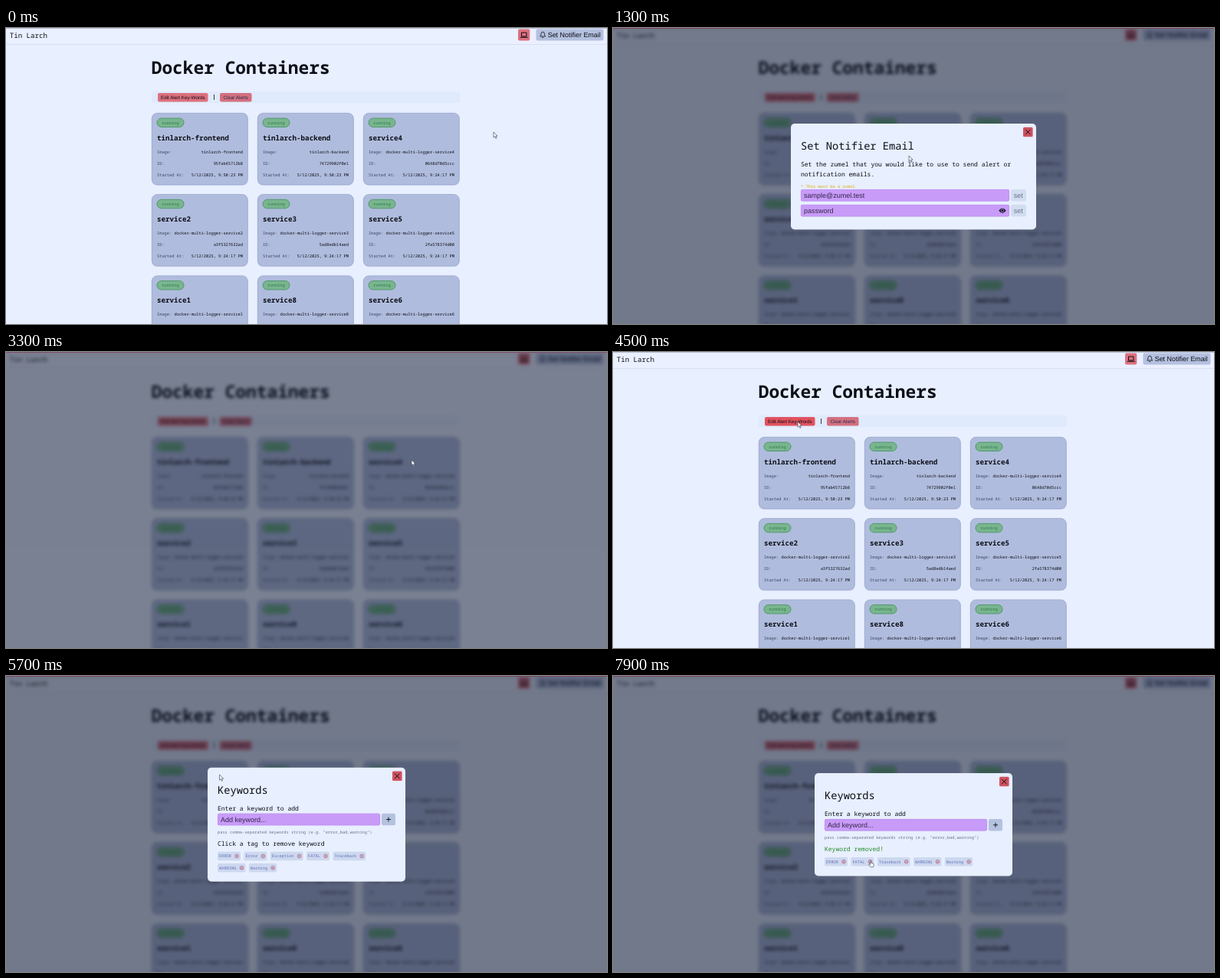
Recreate the animation shown at these times as an HTML page. Size 784 by 387 pixels, loop 8000 ms.

```html
<!DOCTYPE html>
<html lang="en">
<head>
<meta charset="utf-8">
<title>Docker Containers</title>
<style>
html, body { margin: 0; width: 100%; height: 100%; overflow: hidden; background: #e8effe; }
svg { display: block; width: 784px; height: 387px; }
text { font-family: "Noto Sans Mono", "DejaVu Sans Mono", monospace; text-rendering: geometricPrecision; white-space: pre; }
.sans { font-family: "Liberation Sans", Arial, sans-serif; }
</style>
</head>
<body>
<svg viewBox="0 0 784 387">
  <rect width="784" height="387" fill="#e8effe"/>
  <g id="page"></g>
  <g id="shade">
    <rect width="784" height="387" fill="#0a1224" fill-opacity=".53"/>
    <rect width="784" height="1" fill="#7a4560"/>
  </g>
  <g id="emailBox"></g>
  <g id="wordBox"></g>
  <g id="cursor">
    <path id="arrow" d="M0 0V7.2L1.7 5.7L2.9 8.4L4.1 7.9L2.9 5.2H5.1Z" fill="#f6f7fb" stroke="#333a48" stroke-width=".6"/>
    <path id="hand" d="M0 .8Q.7-.3 1.4 .8V3.6L4.2 4.2Q5 4.5 4.8 5.5L4.2 8.8H.4L-1.9 5.6Q-1.6 4.5 0 5.5Z" fill="#f6f7fb" stroke="#333a48" stroke-width=".6"/>
  </g>
</svg>
<script>
const LOOP = 8000, SMALL = 5.34, BODY = 8.02, HEAD = 13.7, CHAR = 3.2;
const INK = '#0b0e16';
const el = id => document.getElementById(id);

const rect = (x, y, w, h, fill, r = 0, more = '') =>
  `<rect x="${x}" y="${y}" width="${w}" height="${h}" rx="${r}" fill="${fill}" ${more}/>`;
const text = (s, x, y, size, fill = INK, more = '') =>
  `<text x="${x}" y="${y}" font-size="${size}" fill="${fill}" ${more}>${s}</text>`;
const sans = (s, x, y, size, fill = INK) => text(s, x, y, size, fill, 'class="sans"');
const line = (d, color = INK, width = 1) =>
  `<path d="${d}" fill="none" stroke="${color}" stroke-width="${width}"/>`;

function card([name, image, id, time], i) {
  const x = 190 + i % 3 * 138, y = 111 + Math.floor(i / 3) * 106.3;
  const rows = [['Image:', image], ['ID:', id], ['Started At:', `5/12/2025, ${time} PM`]];
  return rect(x, y + 1, 125.5, 94, '#c9d3ea', 7) +
    rect(x + .3, y + .3, 125, 93.5, '#b0bcdd', 7, 'stroke="#94a3ca" stroke-width=".7"') +
    rect(x + 7, y + 7, 35, 11.5, '#79b58f', 5.7, 'stroke="#3f9159" stroke-width=".8"') +
    text('running', x + 13.3, y + 14.6, SMALL, '#2c7a45') +
    text(name, x + 7, y + 35.7, 9.2, INK, 'font-weight="700"') +
    rows.map(([key, value], n) =>
      text(key, x + 7, y + 52.6 + n * 15, SMALL, '#3c4560') +
      text(value, x + 119, y + 52.6 + n * 15, SMALL, INK, 'text-anchor="end"')).join('');
}

function buildPage() {
  const service = (n, id) => ['service' + n, 'docker-multi-logger-service' + n, id, '9:24:17'];
  const app = (name, id) => [name, name, id, '9:50:23'];
  const cards = [
    app('tinlarch-frontend', '95fab45712b8'), app('tinlarch-backend', '74729902f0e1'),
    service(4, '0648d70d5ccc'), service(2, 'a3f5327632ad'), service(3, '5ad8edb14aed'),
    service(5, '2fa578374d00'), service(1, ''), service(8, ''), service(6, '')
  ];
  return rect(0, 0, 784, 21, '#eaf0ff') + rect(0, 0, 784, 1, '#b9c3da') + rect(0, 21, 784, .7, '#d2dbee') +
    text('Tin Larch', 4.7, 12.6, 9.15) +
    rect(668, 1.5, 15.3, 15, '#dd707e', 2) +
    line('M672.5 6H679V11H672.5ZM670.8 12.3H680.7', INK, 1) +
    rect(691.5, 1.5, 88, 15, '#b4c0de', 2) +
    line('M696.7 11Q698 10 698 7.5Q698 5.2 700.2 5.2Q702.4 5.2 702.4 7.5Q702.4 10 703.7 11ZM699.2 12.6H701.2', INK, .8) +
    sans('Set Notifier Email', 706.7, 12.3, 8.95) +
    text('Docker Containers', 189.7, 60, 22.85, INK, 'font-weight="700"') +
    rect(190, 83, 402, 15, '#e0eafd', 2) +
    rect(198, 85, 65.5, 11.5, '#dd707e', 2, 'id="edit"') +
    sans('Edit Alert Key-Words', 202, 93, 6.25) +
    rect(271, 87, .8, 7, INK) +
    rect(279, 85, 41.5, 11.5, '#d4707f', 2) +
    sans('Clear Alerts', 283.5, 93, 6.25, '#252c50') +
    cards.map(card).join('');
}

const panel = (x, y, w, h) => rect(x, y, w, h, '#e8effe', 5) +
  rect(x + w - 17, y + 4.7, 12.6, 12.6, '#d05260', 1.5) +
  line(`M${x + w - 14} ${y + 7.7}l6.6 6.6m0-6.6l-6.6 6.6`);
const field = (label, x, y, w) => rect(x, y, w, 15.5, '#c89bf8', 2) +
  rect(x + .3, y + .3, w - .6, 14.9, 'none', 2, 'stroke="#b28ae6" stroke-width=".5"') +
  sans(label, x + 4, y + 10.9, 9, '#33264a');

function buildEmailBox() {
  const setter = y => rect(519, y, 20, 15.5, '#d3ddf1', 2) + sans('set', 522.7, y + 10.8, 9, '#68738e');
  return panel(232, 125, 320, 138.5) +
    text('Set Notifier Email', 245, 159, HEAD) +
    text('Set the zumel that you would like to use to send alert or', 245, 181, BODY) +
    text('notification emails.', 245, 194, BODY) +
    text('* This must be a zumel.', 245, 208.7, SMALL, '#e3bf55', 'font-weight="600"') +
    field('sample@zumel.test', 245, 211, 272) + setter(211) +
    field('password', 245, 231, 272) + setter(231) +
    '<path d="M503.3 238.8Q508 232.6 512.7 238.8Q508 245 503.3 238.8Z" fill="#0b0e16"/>' +
    '<circle cx="508" cy="238.8" r="1.9" fill="#0b0e16" stroke="#c89bf8" stroke-width=".8"/>';
}

function buildWordBox(words, removed) {
  let x = 276, row = 0;
  const tags = words.map(word => {
    const w = word.length * CHAR + 14;
    if (x + w > 508) { x = 276; row++; }
    const tag = { word, x, w, row };
    x += w + 4.4;
    return tag;
  });
  const h = row ? 149 : 134.5, y = 194.3 - h / 2;
  return panel(263, y, 258, h) +
    text('Keywords', 276, y + 34.2, HEAD) +
    text('Enter a keyword to add', 276, y + 56, BODY, INK, 'font-weight="500"') +
    field('Add keyword...', 276, y + 60, 212) +
    rect(490, y + 60, 18, 15.5, '#b4c2e0', 2) + line(`M496 ${y + 67.7}h6m-3-3v6`, INK, .9) +
    text('pass comma-separated keywords string (e.g. "error,bad,warning")', 276, y + 86, SMALL, '#667089') +
    (removed ? text('Keyword removed!', 276, y + 102, BODY, '#258a2c', 'font-weight="500"')
             : text('Click a tag to remove keyword', 276, y + 102, BODY, INK, 'font-weight="500"')) +
    tags.map(tag => {
      const ty = y + 110 + tag.row * 15.3, cx = tag.x + tag.w - 5, cy = ty + 5.7;
      return rect(tag.x, ty, tag.w, 11.4, '#cdd8f0', 2) +
        text(tag.word, tag.x + 2, ty + 7.5, SMALL, '#6074b4') +
        `<circle cx="${cx}" cy="${cy}" r="2.3" fill="none" stroke="#b04a60" stroke-width=".7"/>` +
        line(`M${cx - 1} ${cy - 1}l2 2m0-2l-2 2`, '#b04a60', .7);
    }).join('');
}

const clamp = v => Math.max(0, Math.min(1, v));
const part = (t, from, to) => clamp((t - from) / (to - from));
const smooth = p => p * p * (3 - 2 * p);
const easeOut = p => 1 - (1 - p) ** 2;

// time, x, y of the pointer tip
const path = [
  [0, 636, 136], [80, 636, 136], [420, 715, 7], [950, 715, 7], [1300, 386, 167], [1900, 386, 167],
  [2600, 539, 133], [3100, 539, 133], [3300, 529, 141], [3700, 529, 141], [4300, 241, 91],
  [5400, 241, 91], [6300, 385, 236.5], [7350, 385, 236.5], [7650, 335.5, 241], [LOOP, 335.5, 241]
];
function pointer(t) {
  const i = path.findIndex(k => k[0] > t), [t0, x0, y0] = path[i - 1], [t1, x1, y1] = path[i];
  const p = smooth(part(t, t0, t1));
  return [x0 + (x1 - x0) * p, y0 + (y1 - y0) * p];
}

function pose(box, p, opacity) {
  const s = 1 - .21 * (1 - p);
  box.setAttribute('transform', `translate(392 ${194.3 + 87 * (1 - p)}) scale(${s}) translate(-392 -194.3)`);
  box.setAttribute('opacity', opacity);
}

const allWords = ['ERROR', 'Error', 'Exception', 'FATAL', 'Traceback', 'WARNING', 'Warning'];
let shownCount = -1;
function showWords(gone) {
  if (gone === shownCount) return;
  shownCount = gone;
  const dropped = ['Exception', 'Error'].slice(0, gone);
  el('wordBox').innerHTML = buildWordBox(allWords.filter(w => !dropped.includes(w)), gone > 0);
}

function draw(t) {
  const open1 = easeOut(part(t, 430, 880)), close1 = part(t, 3100, 3250);
  const open2 = easeOut(part(t, 4600, 5050));
  pose(el('emailBox'), open1 * (1 - .3 * close1), clamp(open1 * 1.35) * (1 - close1));
  pose(el('wordBox'), open2, clamp(open2 * 1.35));
  showWords((t >= 7300) + (t >= 7750));

  const dim = part(t, 430, 630) * (1 - smooth(part(t, 3250, 3600))) + part(t, 4600, 4790);
  el('shade').setAttribute('opacity', dim);
  el('page').style.filter = dim ? `blur(${2 * dim}px)` : 'none';
  el('edit').setAttribute('fill', t > 4200 && t < 5600 ? '#e2525f' : '#dd707e');

  el('cursor').setAttribute('transform', `translate(${pointer(t)})`);
  const hand = t > 6250;
  el('hand').setAttribute('visibility', hand ? 'visible' : 'hidden');
  el('arrow').setAttribute('visibility', hand ? 'hidden' : 'visible');
}

el('page').innerHTML = buildPage();
el('emailBox').innerHTML = buildEmailBox();
const start = performance.now();
(function tick() {
  draw((performance.now() - start) % LOOP);
  requestAnimationFrame(tick);
})();
</script>
</body>
</html>
```
